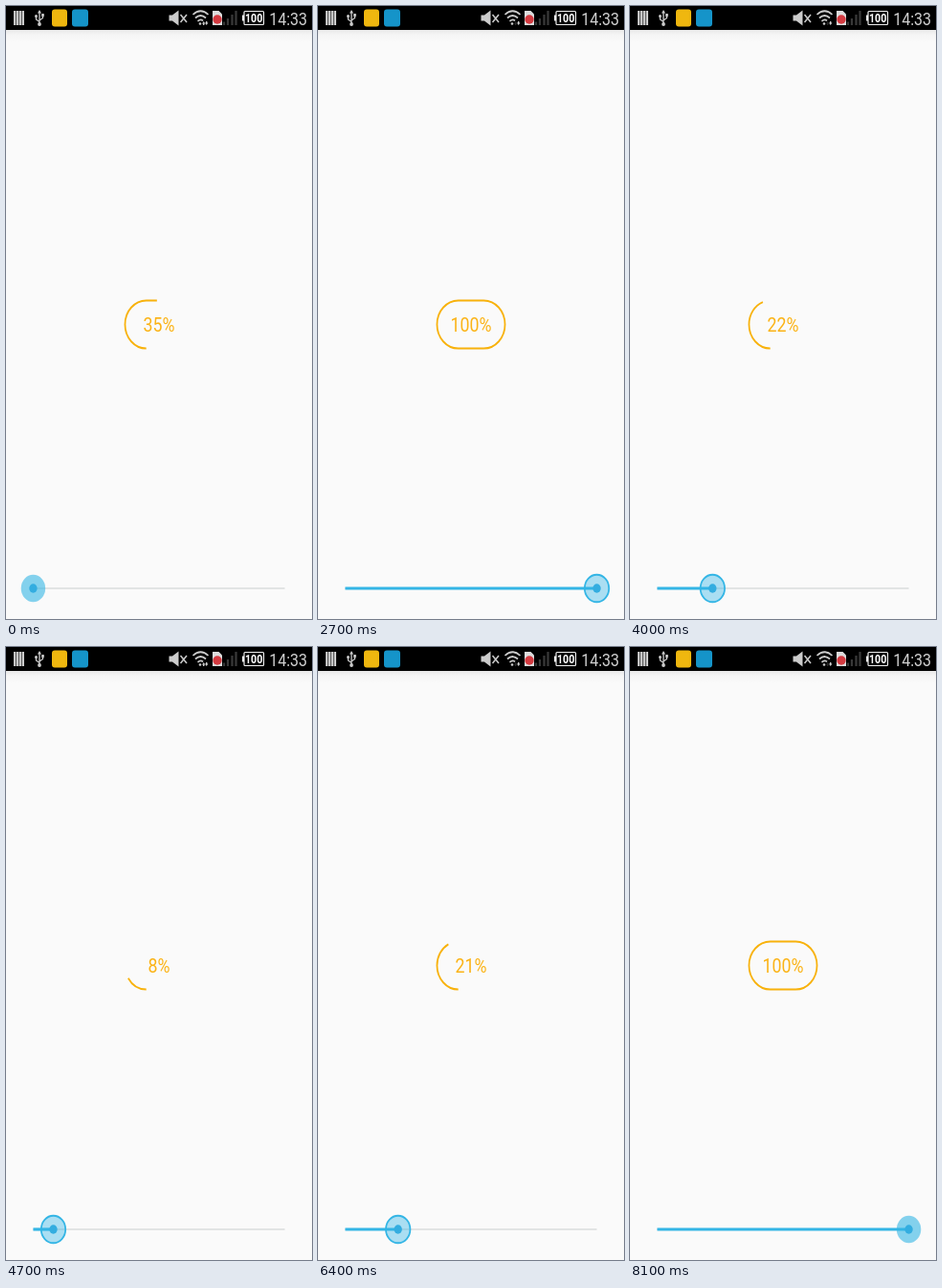
Recreate the animation shown at these times as an HTML page. Size 320 by 640 pixels, loop 8300 ms.

```html
<!DOCTYPE html>
<html lang="en">
<head>
<meta charset="utf-8">
<title>Progress ring</title>
<style>
  html, body { margin: 0; height: 100%; overflow: hidden; background: #fafafa; }
  svg { display: block; width: 100vw; height: 100vh; font-family: Roboto, sans-serif; }
  #thumb circle { fill: #33b5e5; fill-opacity: .6; }
  #thumb.pressed circle { fill-opacity: .4; stroke: #33b5e5; stroke-width: 2; }
  #thumb .dot { fill: #33ade0; fill-opacity: 1 !important; stroke: none !important; }
</style>
</head>
<body>
<!-- A 360 x 640 screen squeezed into the stage -->
<svg viewBox="0 0 360 640" preserveAspectRatio="none">
  <defs>
    <linearGradient id="shade" x2="0" y2="1">
      <stop stop-color="#e9e9e9"/>
      <stop offset=".4" stop-color="#f5f5f5"/>
      <stop offset="1" stop-color="#fafafa"/>
    </linearGradient>
  </defs>
  <rect width="360" height="640" fill="#fafafa"/>
  <rect y="25" width="360" height="13" fill="url(#shade)"/>
  <rect width="360" height="25"/>

  <g transform="scale(1.125 1)" fill="#ccc" stroke="#ccc" stroke-width="0">
    <path d="M8 5h11v15H8z"/>
    <path d="M10.4 5v15M13.4 5v15M16.4 5v15" stroke="#333" stroke-width=".8"/>
    <!-- USB -->
    <path d="M35 6v13M35 16.500L31.500 14v-3M35 15l3.500-2.500V9.500" fill="none" stroke-width="1.300"/>
    <path d="M35 4l2 3.500h-4zM37.200 8h2.600v3h-2.600z"/>
    <circle cx="31.500" cy="10.500" r="1.500"/>
    <circle cx="35" cy="19" r="1.900"/>
    <!-- App badges -->
    <rect x="48" y="3.500" width="16" height="18" rx="3" fill="#efb70f"/>
    <rect x="69" y="3.500" width="17" height="18" rx="3" fill="#1594c9"/>
    <!-- Muted speaker -->
    <path d="M170.500 9.500h3.500l6.500-5v16l-6.500-5h-3.500z"/>
    <path d="M182.500 9l6.500 8M189 9l-6.500 8" stroke-width="1.500"/>
    <!-- Wi-Fi -->
    <path d="M195.500 9q8-7.500 16 0M198 12.500q5.500-5 11 0M200.500 16q3-3 5.500-.6" fill="none" stroke-width="1.700"/>
    <circle cx="203" cy="18.500" r="1.300"/>
    <path id="upload" d="M205 18.500l1.700-2.500 1.700 2.500h-1v1.500h-1.400v-1.500z"/>
    <path d="M208 17.500h1v-1.500h1.400v1.500h1l-1.700 2.500z"/>
    <!-- SIM and signal -->
    <path d="M216 5h6.500l3.500 3.500V20h-10z" fill="#ddd"/>
    <circle cx="221" cy="14" r="4.700" fill="#d43a40"/>
    <path d="M228 20v-3.500M232 20v-7M236.500 20V9M240.500 20V5" stroke="#383838" stroke-width="2.300"/>
    <!-- Battery -->
    <rect x="249" y="5.500" width="20.500" height="14" rx="1" fill="none" stroke="#eee" stroke-width="1.200"/>
    <path d="M247 9.500h2v6h-2z" fill="#eee"/>
  </g>
  <text x="291.500" y="17" font-size="12" font-weight="700" fill="#fff" text-anchor="middle">100</text>
  <text x="332" y="20" font-size="18" fill="#d0d0d0" text-anchor="middle">14:33</text>

  <path id="ring" d="M165 357.500a25 25 0 0 1 0-50h30a25 25 0 0 1 0 50h-30" fill="none" stroke="#f8b20c" stroke-width="2"/>
  <text id="label" x="180" y="340" font-size="20" fill="#fbb316" text-anchor="middle">35%</text>

  <path d="M32 608H328" stroke="#e2e4e4" stroke-width="2"/>
  <path id="bar" stroke="#33b5e5" stroke-width="3.200"/>
  <g id="thumb">
    <circle r="14.300"/>
    <circle class="dot" r="4.700"/>
  </g>
</svg>
<script>
const LOOP = 8300, STEP = 100, PRESS = 1600, RELEASE = 8100;
const ARC = 25 * Math.PI, LINE = 30;
const el = id => document.getElementById(id);
const [ring, label, bar, thumb, upload] = ['ring', 'label', 'bar', 'thumb', 'upload'].map(el);

// Slider drags: [time in ms, percent]
const drags = [
  [0, 0], [1600, 0], [1800, 21], [2400, 86], [2500, 95], [2700, 100],
  [3100, 100], [3400, 87], [4000, 22], [4200, 7], [4400, 0],
  [4600, 0], [4800, 16], [5200, 87], [5300, 95], [5500, 100],
  [5800, 100], [5900, 97], [6000, 86], [6400, 21], [6700, 5], [7000, 0],
  [7200, 0], [7400, 15], [7900, 94], [8000, 100], [LOOP, 100]
];

function sliderAt(t) {
  const i = drags.findIndex(([time]) => time > t);
  const [t0, v0] = drags[i - 1], [t1, v1] = drags[i];
  return Math.round(v0 + (v1 - v0) * (t - t0) / (t1 - t0));
}

// Each of the four sides takes a quarter of the progress
const ringLength = percent => [ARC, LINE, ARC, LINE].reduce(
  (sum, side, i) => sum + side * Math.min(1, Math.max(0, percent / 25 - i)), 0);

function draw(now) {
  const t = Math.floor(now % LOOP / STEP) * STEP;
  const value = sliderAt(t);
  const percent = t < PRESS ? 35 : value;
  const x = 32 + 2.96 * value;
  const pressed = t >= PRESS && t < RELEASE;

  ring.setAttribute('stroke-dasharray', percent === 100 ? 'none' : `${ringLength(percent)} 999`);
  label.textContent = percent + '%';
  bar.setAttribute('d', `M32 608H${x}`);
  thumb.setAttribute('transform', `translate(${x} 608)`);
  thumb.setAttribute('class', pressed ? 'pressed' : '');
  upload.setAttribute('opacity', t < 1100 || t >= 4200 && t < 5000 ? 1 : 0.2);
  requestAnimationFrame(draw);
}
requestAnimationFrame(draw);
</script>
</body>
</html>
```
